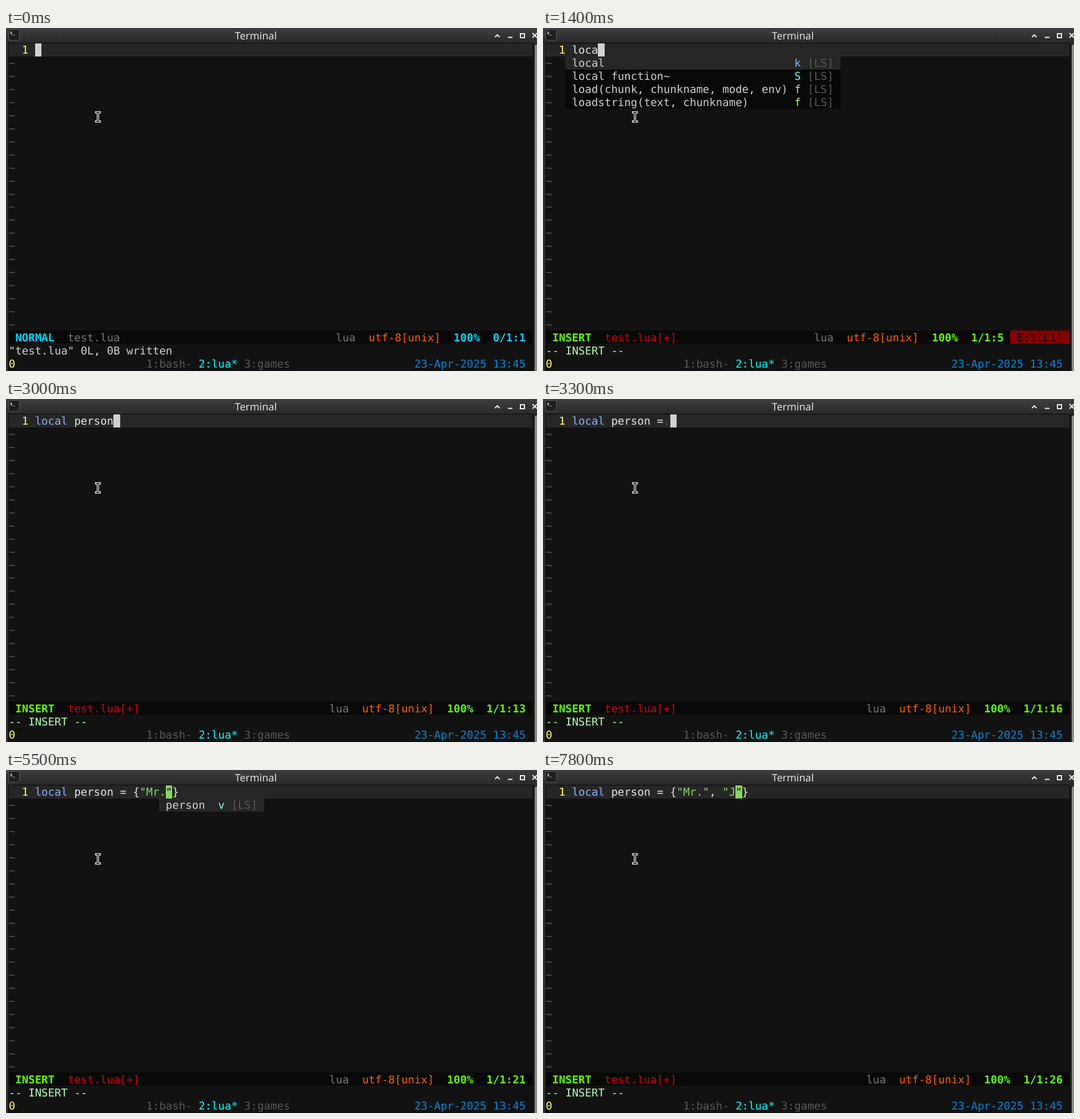
Recreate the animation shown at these times as an HTML page with a canvas. Size 930 px wide and 602 px high, loop 8 s.

```html
<!DOCTYPE html>
<html>
<head>
<meta charset="utf-8">
<style>
  html, body { margin: 0; width: 100%; height: 100%; overflow: hidden; background: #121212; }
  canvas { display: block; }
</style>
</head>
<body>
<canvas id="stage" width="930" height="602"></canvas>
<script>
const ctx = document.getElementById('stage').getContext('2d');
const LOOP = 8000, CELL_W = 11.46, CELL_H = 22.94, LEFT = 4.8, TOP = 26.8;
const BG = '#121212', LINE = '#262626', BAR = '#080808', FG = '#d0d0d0', DIM = '#585858';
const BLUE = '#87afff', GREEN = '#87d75f', LIME = '#5fff00', CYAN = '#00d7ff', YELLOW = '#ffff5f';
const KIND = { k: BLUE, S: '#5fffff', f: '#afff5f', v: '#87ffff' };

const lo = ['local|k', 'local function~|S', 'load(chunk, chunkname, mode, env)|f',
  'loadstring(text, chunkname)|f', 'loadfile(filename, mode, env)|f'];
const person = { start: 0, items: ['person|v'] };
const word = (length, items) => ({ start: -length, items });
const pkg = n => word(n, ['package|v']);

// time, text before the cursor, text after it, extras
const steps = [
  [0, '', '', { normal: true }],
  [100, '', ''],
  [1000, 'l', ''],
  [1100, 'lo', '', { menu: word(2, lo) }],
  [1300, 'loc', '', { menu: word(3, lo.slice(0, 4)) }],
  [1400, 'loca', '', { menu: word(4, lo.slice(0, 4)), error: true }],
  [1700, 'local', '', { menu: word(5, lo.slice(0, 2)), error: true }],
  [1800, 'local ', '', { error: true }],
  [2400, 'local p', '', { error: true }],
  [2500, 'local pe', '', { menu: pkg(2) }],
  [2600, 'local per', '', { menu: pkg(3) }],
  [2700, 'local pers', '', { menu: pkg(4) }],
  [2900, 'local perso', ''],
  [3000, 'local person', ''],
  [3100, 'local person ', ''],
  [3200, 'local person =', ''],
  [3300, 'local person = ', ''],
  [3900, 'local person = {', '}', { error: true }],
  [4400, 'local person = {"', '"}'],
  [4500, 'local person = {"', '"}', { menu: person }],
  [4800, 'local person = {"M', '"}'],
  [5300, 'local person = {"Mr', '"}'],
  [5400, 'local person = {"Mr.', '"}'],
  [5500, 'local person = {"Mr.', '"}', { menu: person }],
  [6000, 'local person = {"Mr."', '}'],
  [6200, 'local person = {"Mr."', ',', { pending: ',' }],
  [6400, 'local person = {"Mr.", ', '}'],
  [7300, 'local person = {"Mr.", "', '"}'],
  [7500, 'local person = {"Mr.", "', '"}', { menu: person }],
  [7800, 'local person = {"Mr.", "J', '"}']
];

const colX = c => LEFT + c * CELL_W;
const rowY = r => TOP + r * CELL_H;

function rect(x, y, w, h, color) {
  ctx.fillStyle = color;
  ctx.fillRect(x, y, w, h);
}

function fillCells(col, row, count, color) {
  const x = Math.round(colX(col)), y = Math.round(rowY(row));
  rect(x, y, Math.round(colX(col + count)) - x, Math.round(rowY(row + 1)) - y, color);
}

function put(text, col, row, color, bold) {
  ctx.font = (bold ? 'bold ' : '') + '19px "DejaVu Sans Mono", monospace';
  ctx.fillStyle = color;
  ctx.textAlign = 'left';
  [...text].forEach((ch, i) => {
    if (ch !== ' ') ctx.fillText(ch, colX(col + i), rowY(row) + 18.4);
  });
}

function stroke(points, color, width, close) {
  ctx.beginPath();
  points.forEach(([x, y]) => ctx.lineTo(x, y));
  if (close) ctx.closePath();
  ctx.strokeStyle = color;
  ctx.lineWidth = width;
  ctx.stroke();
}

function drawWindow() {
  rect(0, 0, 930, 602, '#2e2e2e');
  const grad = ctx.createLinearGradient(0, 0, 0, 27);
  grad.addColorStop(0, '#3e3e3e');
  grad.addColorStop(1, '#282828');
  rect(0, 0, 930, 27, grad);
  rect(4, 26, 919, 576, '#0a0a0a');
  rect(5, 27, 917, 574, BG);
  rect(923, 27, 7, 575, '#1c1c1c');
  ctx.fillStyle = '#8a8a8a';
  ctx.beginPath();
  ctx.roundRect(926, 29, 6, 580, 3);
  ctx.fill();

  ctx.fillStyle = '#1e1e1e';
  ctx.beginPath();
  ctx.roundRect(4.5, 2.5, 19, 19, 3);
  ctx.fill();
  ctx.strokeStyle = '#5c5c5c';
  ctx.lineWidth = 1;
  ctx.stroke();
  ctx.fillStyle = '#e0e0e0';
  ctx.font = 'bold 7px "DejaVu Sans Mono", monospace';
  ctx.textAlign = 'left';
  ctx.fillText('$_', 7, 11);

  ctx.font = '18px "Noto Sans", sans-serif';
  ctx.textAlign = 'center';
  ctx.fillText('Terminal', 437.5, 20);

  const white = '#f0f0f0';
  stroke([[856.5, 16], [860.5, 12], [864.5, 16]], white, 2);
  stroke([[879, 16.5], [887, 16.5]], white, 2);
  stroke([[901, 10], [908, 10], [908, 17], [901, 17]], white, 2, true);
  stroke([[922, 9], [930, 17]], white, 2);
  stroke([[922, 17], [930, 9]], white, 2);
}

function drawLine(before, after, pending) {
  const text = before + after, cursor = before.length;
  fillCells(0, 0, 80, LINE);
  put('1', 2, 0, YELLOW);
  if (after[0] === '}' || pending) fillCells(4 + text.indexOf('{'), 0, 1, '#4e4e4e');
  let cursorColor = FG;
  for (const m of text.matchAll(/local\b|"[^"]*"?|./g)) {
    const token = m[0];
    const color = token === 'local' ? BLUE : token[0] === '"' ? GREEN : '#e4e4e4';
    put(token, 4 + m.index, 0, color);
    if (token[0] === '"' && cursor >= m.index && cursor < m.index + token.length) cursorColor = GREEN;
  }
  if (text.endsWith(' ')) put('.', 3 + text.length, 0, '#4e4e4e');
  fillCells(4 + cursor, 0, 1, cursorColor);
  if (after) put(after[0], 4 + cursor, 0, BG);
}

function drawMenu({ start, items }, cursor) {
  const col = 4 + cursor + start;
  const rows = items.map(item => item.split('|'));
  const width = Math.max(7, ...rows.map(r => r[0].length));
  rows.forEach(([label, kind], i) => {
    fillCells(col - 1, i + 1, width + 9, i ? BAR : LINE);
    put(label, col, i + 1, FG);
    put(kind, col + width + 1, i + 1, KIND[kind]);
    put('[LS]', col + width + 3, i + 1, DIM);
  });
}

function drawStatus(text, cursor, { normal, error, pending }) {
  const mode = normal ? CYAN : LIME;
  fillCells(0, 22, 80, BAR);
  put(normal ? 'NORMAL' : 'INSERT', 1, 22, mode, true);
  put(text ? 'test.lua[+]' : 'test.lua', 9, 22, text ? '#d70000' : '#767676');
  const pos = (text ? 1 : 0) + '/1:' + (cursor + 1);
  const at = (error ? 70 : 79) - pos.length;
  put('lua', at - 24, 22, '#767676');
  put('utf-8[unix]', at - 19, 22, '#ff5f00');
  put('100%', at - 6, 22, mode, true);
  put(pos, at, 22, mode, true);
  if (error) {
    fillCells(71, 22, 9, '#870000');
    put('E:1(L1)', 72, 22, '#000');
  }
  if (normal) put('"test.lua" 0L, 0B written', 0, 23, FG);
  else put('-- INSERT --', 0, 23, '#afffaf');
  if (pending) put(pending, 69, 23, FG);
  put('0', 0, 24, YELLOW);
  put('1:bash-', 21, 24, DIM);
  put('2:lua*', 29, 24, '#00ffff');
  put('3:games', 36, 24, DIM);
  put('23-Apr-2025 13:45', 62, 24, '#0087d7');
}

function drawPointer() {
  for (const [color, width] of [['#f0f0f0', 4], ['#000', 1.4]]) {
    ctx.lineCap = 'square';
    stroke([[161, 148], [161, 164]], color, width);
    stroke([[158, 148], [164, 148]], color, width);
    stroke([[158, 164], [164, 164]], color, width);
    ctx.lineCap = 'butt';
  }
}

function render(time) {
  const [, before, after, extra = {}] = steps.findLast(step => step[0] <= time);
  ctx.textRendering = 'geometricPrecision';
  drawWindow();
  drawLine(before, after, extra.pending);
  for (let row = 1; row < 22; row++) put('~', 0, row, DIM);
  if (extra.menu) drawMenu(extra.menu, before.length);
  drawStatus(before + after, before.length, extra);
  drawPointer();
}

const origin = performance.now();
function tick() {
  render((performance.now() - origin) % LOOP);
  requestAnimationFrame(tick);
}
tick();
</script>
</body>
</html>
```
